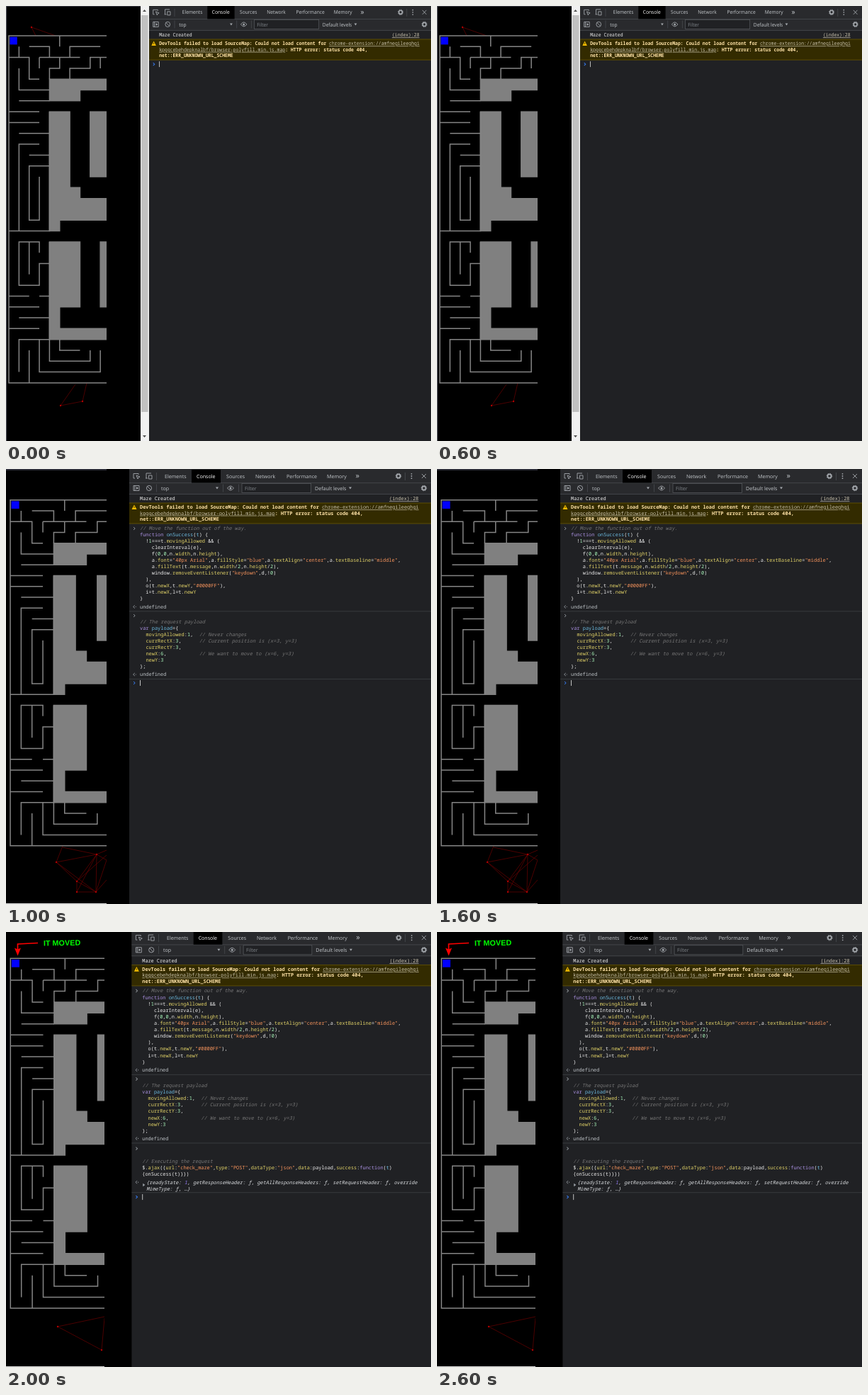
An HTML page for the animation above (3000 ms loop, 600x614 px).

```html
<!DOCTYPE html>
<html>
<head>
<meta charset="utf-8">
<style>
html, body { margin: 0; height: 100%; overflow: hidden; background: #000 }
svg { display: block; width: 600px; height: 614px }
text { white-space: pre; text-rendering: geometricPrecision }
.ui { font: 7.1px "Open Sans", sans-serif; fill: #c4c8cc }
.mono { font: 500 6.92px "Noto Sans Mono", monospace }
.code { font-size: 6.97px }
.warn { font-weight: 600 }
.maze path { vector-effect: non-scaling-stroke; stroke: #858585; stroke-width: 1.5; fill: none }
.maze .solid { fill: #808080; stroke: #808080 }
.icon { stroke: #a4a8ad; fill: none; stroke-width: .9 }
</style>
</head>
<body>
<svg id="stage" viewBox="0 0 600 614"></svg>
<script>
const rect = (x, y, w, h, fill, extra = '') =>
  `<rect x="${x}" y="${y}" width="${w}" height="${h}" fill="${fill}" ${extra}/>`;
const path = (d, attrs = '') => `<path d="${d}" ${attrs}/>`;
const dot = (x, y, r, attrs = '') => `<circle cx="${x}" cy="${y}" r="${r}" ${attrs}/>`;
const escape = s => s.replace(/&/g, '&amp;').replace(/</g, '&lt;');
const label = (x, y, s, attrs = 'class="ui"') => `<text x="${x}" y="${y}" ${attrs}>${escape(s)}</text>`;

// In console text, ~ and a letter switch the style until the next switch.
const styles = {
  w: 'fill="#ececec"', k: 'fill="#a990e0"', d: 'fill="#6cbce2"', p: 'fill="#e2d368"',
  s: 'fill="#f7945c"', n: 'fill="#a9f7bb"', c: 'fill="#777" font-style="italic" font-weight="400"',
  y: 'fill="#ffe3a8"', u: 'fill="#c9c2ad" text-decoration="underline" font-weight="400"',
  g: 'fill="#bdc2c6"', i: 'fill="#dcdfe2" font-style="italic"',
  b: 'fill="#9980ff" font-style="italic"'
};
const line = (x, mid, s, cls = 'mono') => `<text x="${x}" y="${mid + 2.4}" class="${cls}">` +
  ('~w' + s).split('~').slice(1).map(p => `<tspan ${styles[p[0]]}>${escape(p.slice(1))}</tspan>`).join('') + '</text>';
const block = (mid, code) => code.split('\n').map((s, i) => line(189, mid + 9 * i, s, 'mono code')).join('');
const rule = y => rect(174, y, 426, .8, '#3d4043');
const prompt = (y, color = '#8a8f94') => path(`M180 ${y - 2}l2.2 2l-2.2 2`, `fill="none" stroke="${color}"`);
const reply = y => path(`M181.8 ${y - 2}l-2.2 2l2.2 2`, 'fill="none" stroke="#9aa0a6" stroke-width=".9"') +
  dot(183.2, y, .6, 'fill="#9aa0a6"');
const cursor = y => prompt(y, '#367cf1') + rect(189, y - 4, .9, 8, '#d5d5d5');
const gear = (x, y) => dot(x, y, 2.6, 'class="icon" style="stroke-width:1.7"') +
  dot(x, y, 3.8, 'class="icon" stroke-dasharray="1.5 1.485"');
const arrow = (x, y) => path(`M${x} ${y}h4l-2 3z`, 'fill="#a4a8ad"');
const bar = (x, y) => rect(x, y, .8, 11, '#494c50');

const toolbar = rect(174, -4, 430, 640, '#202124') + rect(174, -4, 430, 39.5, '#292a2d') +
  rect(174, 19.3, 426, .8, '#494c50') + rect(262, 1, 41, 18.5, '#000') + rect(174, 35, 426, .8, '#494c50') +
  [[224, 'Elements'], [311, 'Sources'], [352, 'Network'], [396, 'Performance'], [453, 'Memory']]
    .map(([x, s]) => label(x, 12.6, s)).join('') +
  label(269, 12.6, 'Console', 'class="ui" style="fill:#fff"') +
  label(493.5, 13, '»', 'class="ui" style="font-size:11px"') +
  path('M187 8V6.5H180V13h2M184 9l5 2-2 1-1 2z', 'class="icon"') +
  path('M198 13V6h7M201.500 9h4.500v5h-4.500zM197 13h3', 'class="icon"') +
  bar(212, 5) + gear(554, 10) + bar(563, 5) +
  [6.8, 10, 13.2].map(y => dot(572.5, y, .9, 'fill="#a4a8ad"')).join('') +
  path('M587 7l6 6m0-6l-6 6', 'class="icon"') +
  path('M180 23.500h8v7h-8zM182 23.500v7', 'class="icon"') + path('M184 25l3 2-3 2z', 'fill="#a4a8ad"') +
  dot(202, 27, 3.6, 'class="icon"') + path('M199.500 24.500l5 5', 'class="icon"') + bar(212, 21.5) +
  label(219, 29.6, 'top') + arrow(296, 25.5) + bar(306, 21.5) +
  path('M312.500 27q4.500-6 9 0q-4.500 6-9 0z', 'class="icon"') + dot(317, 27, 1.5, 'fill="#a4a8ad"') +
  bar(328, 21.5) + rect(333, 20.5, 97.5, 13, '#202124', 'stroke="#55585c" stroke-width=".8"') +
  label(337, 29.6, 'Filter', 'class="ui" style="fill:#80868b"') +
  label(436, 29.6, 'Default levels') + arrow(484, 25.5) + gear(590, 27);

const messages = line(189, 42, 'Maze Created') + line(541, 42, '~u(index):28') +
  rect(174, 48, 426, 29, '#332b00') + rect(174, 47.6, 426, .8, '#665500') + rect(174, 76.6, 426, .8, '#665500') +
  path('M181 50.500l3.500 6.500h-7z', 'fill="#f4bd00"') + rect(180.6, 52.8, .9, 2.2, '#332b00') +
  ['~yDevTools failed to load SourceMap: Could not load content for ~uchrome-extension://amfnegileeghgi',
   '~ukpggcebehdepknalbf/browser-polyfill.min.js.map~y: HTTP error: status code 404,',
   '~ynet::ERR_UNKNOWN_URL_SCHEME'].map((s, i) => line(189, 54 + 8.3 * i, s, 'mono warn')).join('');

const setup = prompt(84) + block(84, `~c// Move the function out of the way.
~kfunction ~donSuccess~w(~dt~w) {
  !~n1~w===t.~pmovingAllowed~w && (
    clearInterval(e),
    f(~n0~w,~n0~w,n.~pwidth~w,n.~pheight~w),
    a.~pfont~w=~s"40px Arial"~w,a.~pfillStyle~w=~s"blue"~w,a.~ptextAlign~w=~s"center"~w,a.~ptextBaseline~w=~s"middle"~w,
    a.~pfillText~w(t.~pmessage~w,n.~pwidth~w/~n2~w,n.~pheight~w/~n2~w),
    window.~premoveEventListener~w(~s"keydown"~w,d,!~n0~w)
  ),
  o(t.~pnewX~w,t.~pnewY~w,~s"#0000FF"~w),
  i=t.~pnewX~w,l=t.~pnewY~w
}`) + reply(194.5) + line(189, 194.5, '~gundefined') + rule(200.5) +
  prompt(207) + block(216, `~c// The request payload
~kvar ~dpayload~w={
  ~pmovingAllowed~w:~n1~w,  ~c// Never changes
  ~pcurrRectX~w:~n3~w,      ~c// Current position is (x=3, y=3)
  ~pcurrRectY~w:~n3~w,
  ~pnewX~w:~n6~w,           ~c// We want to move to (x=6, y=3)
  ~pnewY~w:~n3~w
};`) + reply(290) + line(189, 290, '~gundefined') + rule(296);

const request = prompt(304) + block(322, `~c// Executing the request
$.~pajax~w({~purl~w:~s"check_maze"~w,~ptype~w:~s"POST"~w,~pdataType~w:~s"json"~w,~pdata~w:payload,~psuccess~w:~kfunction~w(~dt~w)
{onSuccess(t)}})`) + reply(351) + path('M190 352.500l3 2.200-3 2.200z', 'fill="#9aa0a6"') +
  line(195, 351, '~i{readyState: ~b1~i, getResponseHeader: ƒ, getAllResponseHeaders: ƒ, setRequestHeader: ƒ, override') +
  line(195, 360, '~iMimeType: ƒ, …}') + rule(365);

// Maze paths are in cells of a 32-row grid.
const walls = [
  'M10 0H0V32H10M5 0V1M1 1V2M2 1H4V2M9 1H6V2M0 2H2V4H3M3 2H7M3 2V3M4 4V3H5V2M6 4V3H8V2H10M9 2V3M1 3V5H4M1 6H4',
  'M0 7H3M4 7V18H0M0 8H3M1 9H4M3 10H1V18M2 11H4M4 12H2V17H3V13',
  'M3 20V19H1V23H3V21H4M2 19V22M0 24H2M3 24H4M0 25H3M1 26H4M0 27H3M4 19V28',
  'M4 28H1V31M2 29V32M3 28V31H9V29M4 28V30H8V29M5 28V29H7'
].map(d => path(d)).join('');
const solids = path('M4 4H10V5H7V6H4zM4 7H6V14H7V15H10V17H5V18H4zM8 7H10V13H8z' +
  'M4 19H7V25H5V27H10V28H4zM9 19H10V25H9z', 'class="solid"');

const page = (id, width, x, y, sx, sy, sparks, nodes) =>
  `<clipPath id="${id}"><rect width="${width}" height="614"/></clipPath><g clip-path="url(#${id})">` +
  path(sparks, 'fill="none" stroke="#6c0000" stroke-width=".7"') +
  nodes.map(([a, b]) => dot(a, b, 1.2, 'fill="#b00000"')).join('') +
  `<g class="maze" transform="translate(${x} ${y}) scale(${sx} ${sy})">${solids}${walls}` +
  rect(.1, .11, .72, .7, '#00f') + '</g></g>';
const panel = (sx, sy, dy, content) =>
  `<g transform="translate(${600 - 600 * sx} ${dy}) scale(${sx} ${sy})">${toolbar}${messages}${content}</g>`;

const scrollbar = rect(190, 0, 12, 614, '#f1f1f1') + rect(191, 13, 9.5, 560, '#c1c1c1') +
  path('M193 8h5l-2.500-3zM193 606h5l-2.500 3z', 'fill="#505050"');
const note = label(53, 19.6, 'IT MOVED',
  'transform="rotate(-1 53 19.6)" style="font:bold 10.8px \'Liberation Sans\',Arial,sans-serif;fill:#0f0"') +
  path('M45 15.500L16.500 17V26', 'fill="none" stroke="#f00" stroke-width="1.700"') +
  path('M12 22.500l4.500 2 4.500-2L16.500 33.500z', 'fill="#f00"');

const scenes = [
  rect(0, 0, 190, 1, '#33343c') + rect(0, 0, 1, 614, '#4c4d58') +
    page('c0', 142, 4, 42, 14.35, 15.31,
      'M42 42L36 30L70 42M98 534L77 564L108 558L114 532', [[36, 30], [77, 564], [108, 558]]) +
    scrollbar + panel(.934, 1.004, -1.2, cursor(83)),
  rect(0, 0, 142, 2, '#2c2d38') + rect(0, 613, 142, 1, '#ddd') +
    page('c1', 142, 6, 43.7, 15.35, 15.25,
      'M80 532L71 555L128 544L100 582L71 555L127 597H100V582L127 597L128 544L142 552L127 597L142 580M100 582L142 545M128 544L80 534M100 597L128 544L142 538',
      [[71, 555], [128, 544], [100, 582], [127, 597], [100, 597]]) +
    panel(1, 1, 0, setup + cursor(302)),
  rect(0, 613, 139, 1, '#ddd') +
    page('c2', 139, 6.3, 37.2, 15.4, 15.43,
      'M139 545L135 590L73 557L139 543', [[73, 557], [135, 590]]) +
    note + panel(.992, 1.012, -2, setup + request + cursor(371.6))
];
stage.innerHTML = scenes.map(s => `<g>${s}</g>`).join('');
const groups = [...stage.children];

function draw() {
  const current = Math.floor(performance.now() / 1000) % 3;
  groups.forEach((g, i) => g.style.display = i === current ? '' : 'none');
  requestAnimationFrame(draw);
}
draw();
</script>
</body>
</html>
```
